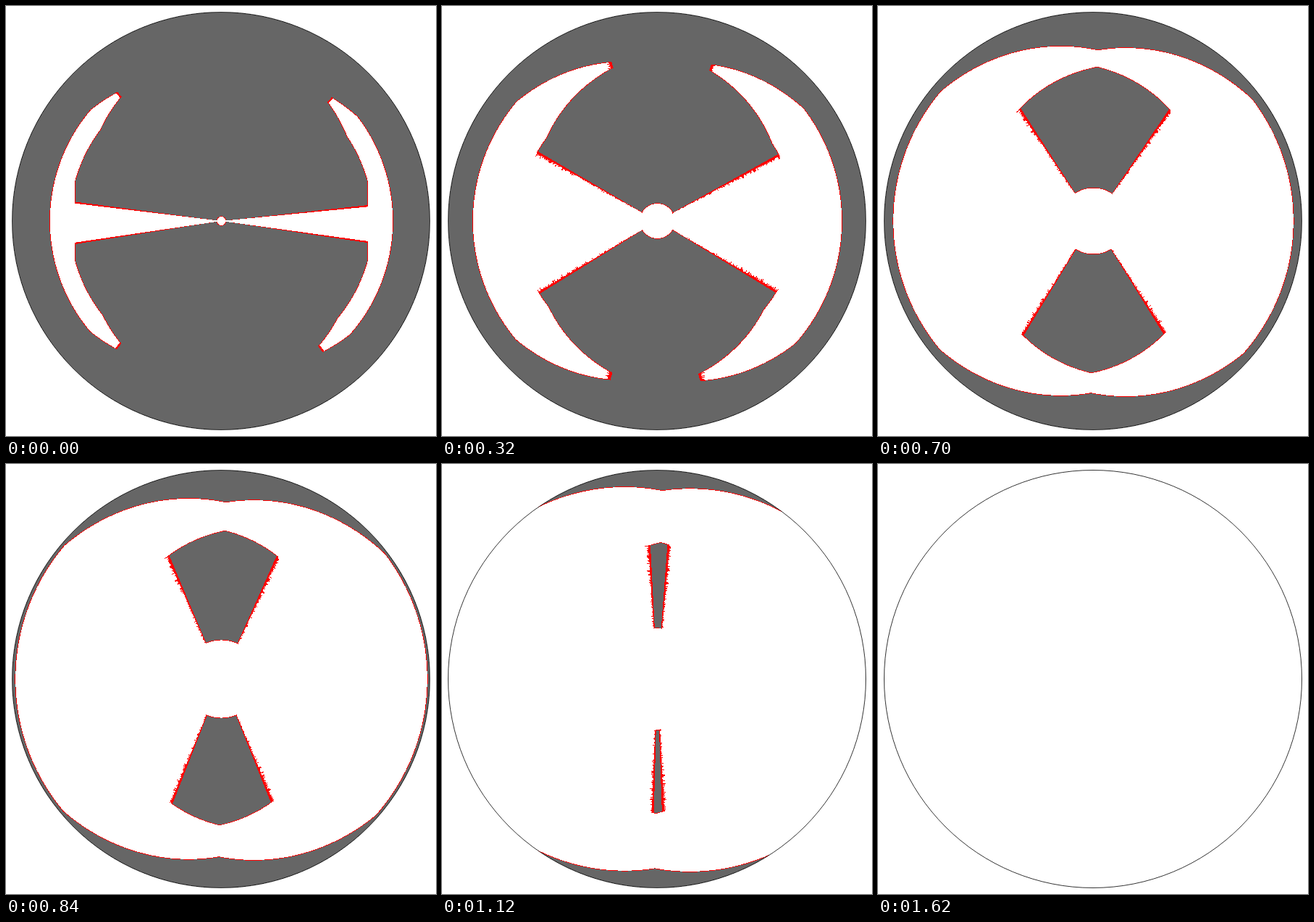
An HTML page with a canvas for the animation above (1640 ms loop, 594 px wide and 594 px high).

```html
<!DOCTYPE html>
<html lang="en">
<head>
<meta charset="utf-8">
<title>Burning grain</title>
<style>
html, body { margin: 0; width: 100%; height: 100%; overflow: hidden; background: #fff; }
canvas { display: block; }
</style>
</head>
<body>
<canvas id="stage" width="594" height="594"></canvas>
<script>
const SIZE = 594, CENTER = 297, RADIUS = 288.5, LOOP = 1640, STEP = 20;
const CORE = { x: 297, y: 296.5 };   // middle of the bore, in pixel indices
const SWEEP = 0.071;                 // degrees per ms of the rotating fronts
const WHITE = 0xffffffff, RED = 0xff0000ff, GREY = 0xff666666;

// Starting angles (degrees above or below the horizontal) on the left and right.
const TOP = { wall: [7.5, 6.2], tip: [51.2, 48.3], inner: 220 };
const BOTTOM = { wall: [9, 8.5], tip: [50.8, 52.3], inner: 218.5 };
const OUTER = 229;

// Depth burned after t ms, and its inverse.
const A = 0.0558, B = 1e-6;
const depth = t => A * t + B * t * t;
const timeAt = s => (Math.sqrt(A * A + 4 * B * s) - A) / (2 * B);

function noise(n) {
  const s = Math.sin(n * 127.1) * 43758.5453;
  return s - Math.floor(s);
}

const arrival = (angle, [left, right]) =>
  Math.min(angle - left, 180 - angle - right) / SWEEP;

// Time when a point burns; fast marks the rotating, ragged fronts.
function burn(r, angle, half) {
  const tip = arrival(angle, half.tip);
  if (r > OUTER) {
    return { time: timeAt(r - OUTER + Math.max(depth(tip), -8.5)), fast: false };
  }
  if (r >= half.inner) return { time: tip, fast: true };

  const cos = Math.abs(Math.cos(angle * Math.PI / 180));
  const edge = Math.min(208.8, 202 / cos) - half.inner;
  const arm = timeAt(half.inner - r + Math.max(depth(tip), edge));
  const hole = timeAt(r - 6.8);
  const wall = arrival(angle, half.wall);
  const time = Math.min(arm, hole, wall);
  return { time, fast: time === wall };
}

const ctx = document.getElementById('stage').getContext('2d');
const image = ctx.createImageData(SIZE, SIZE);
const pixels = new Uint32Array(image.data.buffer).fill(WHITE);
const cells = [];

for (let y = 0; y < SIZE; y++) {
  for (let x = 0; x < SIZE; x++) {
    if (Math.hypot(x + 0.5 - CENTER, y + 0.5 - CENTER) > RADIUS) continue;
    const dx = x - CORE.x, dy = y - CORE.y, r = Math.hypot(dx, dy);
    const angle = Math.atan2(Math.abs(dy), -dx) * 180 / Math.PI;
    const { time, fast } = burn(r, angle, dy < 0 ? TOP : BOTTOM);
    const quadrant = (dx < 0 ? 0 : 1) + (dy < 0 ? 0 : 2);
    const rough = 4 + 22 * noise(Math.round(r) + 300 * quadrant) ** 3;
    cells.push({ i: y * SIZE + x, time, fast, rough });
  }
}

function drawCasing() {
  ctx.lineWidth = 0.8;
  ctx.strokeStyle = '#000';
  ctx.beginPath();
  ctx.arc(CENTER, CENTER, RADIUS, 0, 2 * Math.PI);
  ctx.stroke();
}

let shown = -1;
function draw() {
  const t = Math.floor(performance.now() % LOOP / STEP) * STEP;
  if (t !== shown) {
    shown = t;
    const wear = Math.min(1, t / 300);
    for (const { i, time, fast, rough } of cells) {
      const glow = fast ? 9 + wear * rough : 15;
      pixels[i] = time > t ? GREY : time > t - glow ? RED : WHITE;
    }
    ctx.putImageData(image, 0, 0);
    drawCasing();
  }
  requestAnimationFrame(draw);
}
draw();
</script>
</body>
</html>
```
